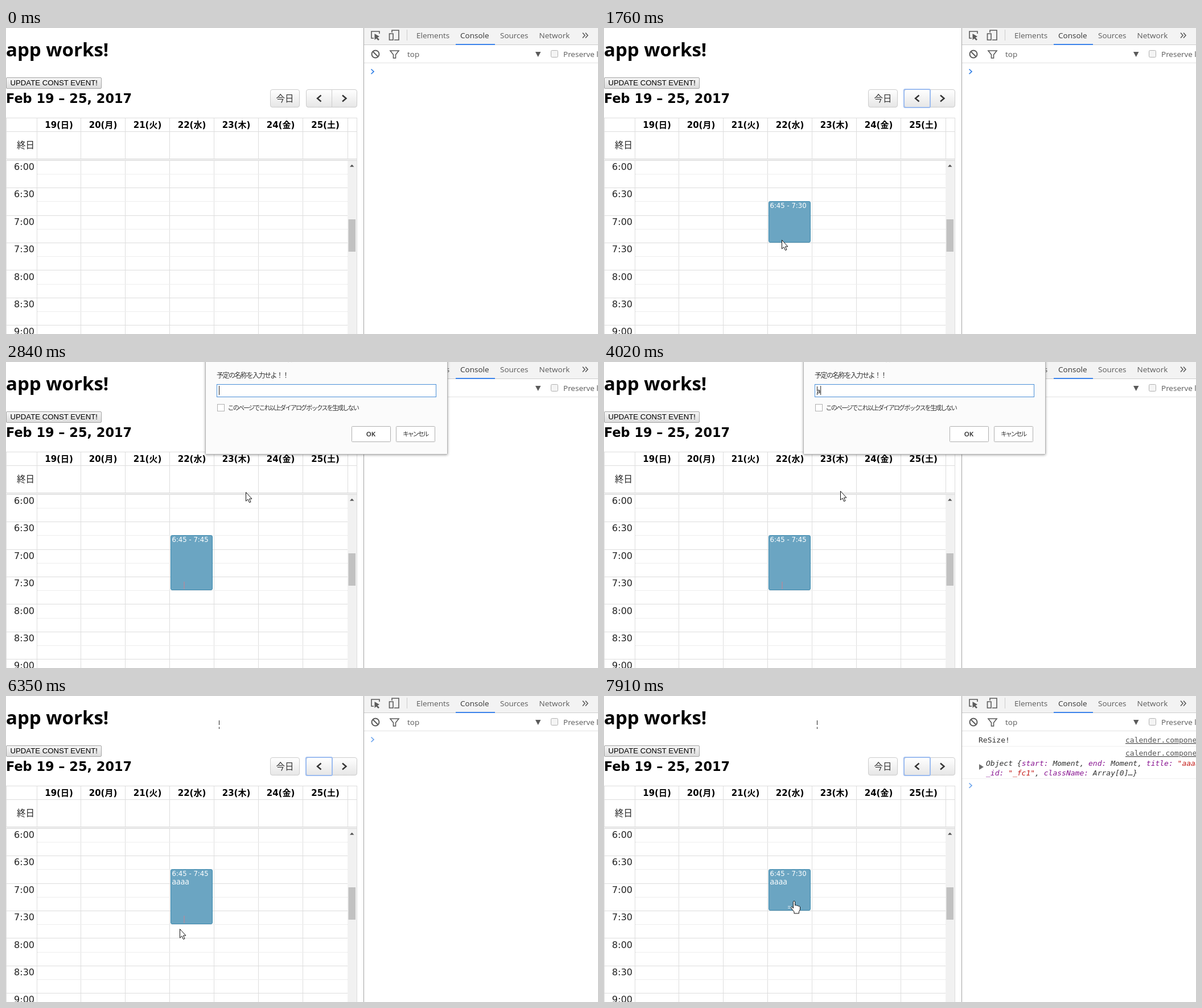
These frames come from a looping animation (1040 by 539 pixels, 8000 ms). An HTML page:

```html
<!DOCTYPE html>
<html lang="ja">
<head>
<meta charset="utf-8">
<title>Calendar demo</title>
<style>
html, body { margin: 0; width: 100%; height: 100%; overflow: hidden; background: #fff; }
svg { display: block; width: 1040px; height: 539px; }
text { font: 16px "DejaVu Sans", "Noto Sans CJK JP", "Noto Sans CJK", sans-serif; white-space: pre; }
.mid { text-anchor: middle; }
.day { font-weight: bold; font-size: 15px; }
.jp { font-family: "Noto Sans CJK JP", "Noto Sans CJK", sans-serif; }
.ui { font: 13.5px "Open Sans", "Noto Sans", sans-serif; fill: #5a5a5a; }
.mono { font: 13px "DejaVu Sans Mono", monospace; fill: #303030; }
.it { font-style: italic; }
.key { fill: #881391; }
.str { fill: #c41a16; }
.link { fill: #545454; text-decoration: underline; }
.icon { fill: none; stroke: #5a5a5a; stroke-width: 1.6; }
.btn { fill: url(#soft); stroke: #ccc; }
.box { fill: #fff; stroke: #b0b0b0; }
</style>
</head>
<body>
<svg viewBox="0 0 1040 539">
  <defs>
    <linearGradient id="soft" x2="0" y2="1"><stop stop-color="#fff"/><stop offset="1" stop-color="#e6e6e6"/></linearGradient>
    <linearGradient id="native" x2="0" y2="1"><stop stop-color="#f6f6f6"/><stop offset="1" stop-color="#dcdcdc"/></linearGradient>
    <filter id="shadow"><feDropShadow dx="0" dy="1" stdDeviation="2" flood-opacity=".35"/></filter>
  </defs>

  <text y="50" style="font:bold 33px 'Noto Sans',sans-serif">app works!</text>
  <rect x=".5" y="87.5" width="167" height="19" rx="1.5" fill="url(#native)" stroke="#a3a3a3"/>
  <text x="7.5" y="101" style="font:13.2px 'Liberation Sans',sans-serif">UPDATE CONST EVENT!</text>
  <text y="132" style="font-weight:bold;font-size:22.4px">Feb 19 – 25, 2017</text>
  <rect class="btn" x="464.5" y="108.5" width="51" height="31" rx="3.5"/>
  <text class="mid jp" x="490" y="130" fill="#333" style="font-size:15.5px">今日</text>
  <rect class="btn" x="527.5" y="108.5" width="89" height="31" rx="3.5"/>
  <path d="M572.5 109V139" stroke="#ccc"/>
  <rect id="focus" x="527" y="108" width="46" height="32" rx="2" fill="none" stroke="#9cbcf0" stroke-width="2"/>
  <path d="M553.5 118.5L547 124L553.5 129.5M591 118.5L597.5 124L591 129.5" fill="none" stroke="#333" stroke-width="2.4"/>

  <g id="grid"></g>
  <text class="jp" x="19" y="211.5" fill="#222" style="font-size:15.5px">終日</text>
  <rect x="600" y="234" width="16" height="305" fill="#f1f1f1"/>
  <rect x="601.5" y="337" width="12.5" height="57" fill="#c1c1c1"/>
  <path d="M604 244.5L607.7 240.5L611.5 244.5Z" fill="#505050"/>

  <g id="event">
    <rect id="eventBox" x="289.5" y="305.5" width="73" rx="2.5" fill="#6ba5c2" stroke="#3a87ad"/>
    <text id="eventTime" x="291.5" y="317" fill="#fff" style="font-size:11.7px"></text>
    <text id="eventTitle" x="291.5" y="332" fill="#fff" style="font:13.5px 'Noto Sans',sans-serif">aaaa</text>
    <path id="trace" d="M313 387V400" stroke="#9d93a8" stroke-width="2"/>
    <path id="grip" d="M323 370.5H328M323 373.5H328" stroke="#e4eef3"/>
  </g>

  <rect x="628" width="412" height="539" fill="#fff"/>
  <rect x="628" width="412" height="30" fill="#f3f3f3"/>
  <path d="M628.5 0V539" stroke="#a3a3a3"/>
  <path d="M629 29.5H1040M704.5 3V22" stroke="#ccc"/>
  <path d="M629 61.5H1040" stroke="#e2e2e2"/>
  <rect x="790" y="28" width="69" height="2" fill="#3b83ea"/>
  <g class="icon">
    <path d="M646 18H642V6H656V10"/>
    <path d="M647.5 10V21L650.5 18.5L654 22L656 20L652.5 17L656 15Z" fill="#5a5a5a" stroke="none"/>
    <path d="M678 8V4H690V21H682M673.5 10H680V21H673.5Z"/>
    <path d="M1013 8.5L1017 13L1013 17.5M1018 8.5L1022 13L1018 17.5"/>
    <circle cx="649" cy="46" r="6.5" stroke-width="2"/><path d="M644.5 41.5L653.5 50.5" stroke-width="2"/>
    <path d="M675 40H690L684.5 47V53H680.5V47Z"/>
  </g>
  <text class="ui" x="721" y="18">Elements</text>
  <text class="ui" x="798" y="18" style="fill:#333">Console</text>
  <text class="ui" x="868" y="18">Sources</text>
  <text class="ui" x="936.5" y="18">Network</text>
  <text class="ui" x="705" y="51">top</text>
  <path d="M930 42H939.5L934.7 51Z" fill="#5a5a5a"/>
  <rect class="box" x="957.5" y="39.5" width="12" height="12" rx="2" style="fill:#f4f4f4"/>
  <text class="ui" x="979" y="51">Preserve log</text>
  <g id="logs">
    <path d="M629 88.5H1040M629 145.5H1040" stroke="#f0f0f0"/>
    <text class="mono" x="658" y="82">ReSize!</text>
    <text class="mono link" x="916" y="82">calender.component.ts</text>
    <text class="mono link" x="916" y="105">calender.component.ts</text>
    <path d="M659 120V130L667 125Z" fill="#6e6e6e"/>
    <text class="mono it" x="671" y="123">Object {<tspan class="key">start:</tspan> Moment, <tspan class="key">end:</tspan> Moment, <tspan class="key">title:</tspan> <tspan class="str">"aaaa"</tspan>,</text>
    <text class="mono it" x="671" y="140"><tspan class="key">_id:</tspan> <tspan class="str">"_fc1"</tspan>, <tspan class="key">className:</tspan> Array[0]…}</text>
  </g>
  <path id="prompt" d="M641.5 72.5L646 76.7L641.5 81" fill="none" stroke="#2f7fe6" stroke-width="1.7"/>

  <g id="dialog">
    <rect x="350.5" y="-25" width="425" height="187.5" rx="1" fill="#fbfbfb" stroke="#b4b4b4" filter="url(#shadow)"/>
    <text class="ui" x="371" y="-1" style="font-size:14px;fill:#222">localhost:4200 <tspan class="jp" font-size="12">の内容:</tspan></text>
    <text class="jp" x="370" y="28" fill="#333" style="font-size:12px;letter-spacing:-1.5px">予定の名称を入力せよ！！</text>
    <rect x="370.5" y="39.5" width="385" height="22" fill="#fff" stroke="#4a8fd8"/>
    <text id="typed" x="374" y="55" style="font:11px 'Noto Sans',sans-serif"></text>
    <path id="caret" d="M374.5 42V58" stroke="#222"/>
    <rect class="box" x="371.5" y="74.5" width="12" height="12"/>
    <text class="jp" x="389.5" y="84.5" fill="#333" style="font-size:11px;letter-spacing:-1.8px">このページでこれ以上ダイアログボックスを生成しない</text>
    <rect class="box" x="607.5" y="113.5" width="68" height="27" rx="1"/>
    <text class="ui mid" x="641" y="131" style="font-size:11.5px;font-weight:600;fill:#222">OK</text>
    <rect class="box" x="685.5" y="113.5" width="68" height="27" rx="1"/>
    <text class="jp" x="697" y="131" fill="#333" style="font-size:11px;letter-spacing:-2.2px">キャンセル</text>
  </g>
  <path id="remnant" d="M374.5 43V51M374.5 54.5V58" stroke="#222"/>

  <g id="pointer" fill="#fff" stroke="#111" stroke-linejoin="round">
    <path id="arrow" d="M.5.5V16L4 12.8L6.5 18.5L9 17.5L6.5 12H11Z"/>
    <path id="hand" d="M-1.6 13V1.8a1.6 1.6 0 0 1 3.2 0V8c.8-1 2.8-.7 3.2.6c.9-.8 2.6-.4 3 .8c1.2-.6 2.7 0 2.7 1.6V15l-2 4v3H0V19L-5 13c-1.2-2 .8-3.6 2.2-2Z"/>
  </g>
</svg>
<script>
const LOOP = 8000, TICK = 77, START = 210, SLOT = 24.2;
const el = id => document.getElementById(id);
const show = (id, on) => el(id).style.display = on ? '' : 'none';
const clamp = v => Math.max(0, Math.min(1, v));

// Calendar grid
const columns = [0, 54, 131, 209, 287, 365, 443, 521, 600];
const line = (d, dash = '') => `<path d="${d}" stroke="#ddd" stroke-dasharray="${dash}"/>`;
let grid = '<rect y="231" width="617" height="2" fill="#eee"/>';
for (const y of [158, 182, 230, 233]) grid += line(`M0 ${y + .5}H617`);
for (const x of columns) grid += line(`M${x + .5} 158V230M${x + .5} 234V539`);
grid += line('M616.5 158V539');
for (let i = 0; i < 12; i++) {
  const y = Math.round(257 + i * SLOT) + .5;
  grid += i % 2 ? line(`M0 ${y}H600`) : line(`M55 ${y}H600`, '1 1');
}
for (let i = 0; i < 7; i++) {
  const hour = `${6 + (i >> 1)}:${i % 2 ? '30' : '00'}`;
  grid += `<text x="50" y="${Math.round(250 + i * 2 * SLOT)}" text-anchor="end" fill="#222">${hour}</text>`;
  grid += `<text class="mid day" x="${(columns[i + 1] + columns[i + 2]) / 2 + .5}" y="176">${19 + i}(${'日月火水木金土'[i]})</text>`;
}
el('grid').innerHTML = grid;

// Pointer path: time, x, y
const path = [
  [210, 640, 501], [590, 256, 400], [970, 309, 319], [1050, 306, 319], [1200, 306, 319],
  [1590, 311, 371], [1750, 312, 373], [1910, 315, 385], [2500, 315, 385], [2690, 421, 229],
  [2840, 421, 229], [3000, 415, 227], [5446, 415, 227], [5523, 426, 233], [6020, 305, 412],
  [6270, 305, 412], [6590, 311, 391], [7063, 311, 391], [7140, 325, 385], [7370, 334, 361]
];
const keyTimes = [4020, 4170, 4400, 4550];

function pointerAt(t) {
  const i = path.findIndex(p => p[0] > t);
  if (i < 0) return path[path.length - 1].slice(1);
  const a = path[Math.max(0, i - 1)], b = path[i];
  const k = clamp((t - a[0]) / (b[0] - a[0]));
  return [1, 2].map(j => Math.round(a[j] + (b[j] - a[j]) * k));
}

function draw(t) {
  const [x, y] = pointerAt(START + Math.floor((t - START) / TICK) * TICK);
  show('pointer', t >= START);
  el('pointer').setAttribute('transform', `translate(${x} ${y})`);
  show('arrow', t < 7140);
  show('hand', t >= 7140);
  show('focus', t >= 1200);

  // The event's end follows the pointer while it is dragged
  const dragging = t < 2500 || t >= 7140;
  const slots = dragging ? Math.max(1, Math.ceil((y - 305) / SLOT)) : 4;
  const end = 6 * 60 + 45 + slots * 15;
  show('event', t >= 1200);
  el('eventBox').setAttribute('height', Math.floor(slots * SLOT));
  el('eventTime').textContent = `6:45 - ${Math.floor(end / 60)}:${String(end % 60).padStart(2, '0')}`;
  show('eventTitle', t >= 4800);
  show('trace', t >= 2600 && t < 7060);
  show('grip', t >= 7830);

  const open = t < 4800 ? clamp((t - 2150) / 250) : clamp(1 - (t - 4780) / 90);
  const scale = .9 + .1 * open;
  const typed = keyTimes.filter(k => t >= k).length;
  show('dialog', t >= 2220 && t < 4870);
  el('dialog').setAttribute('opacity', open);
  el('dialog').setAttribute('transform', `translate(563 70) scale(${scale}) translate(-563 -70)`);
  el('typed').textContent = 'a'.repeat(typed);
  el('caret').setAttribute('transform', `translate(${typed * 6.2})`);
  show('remnant', t >= 4020);

  show('logs', t >= 7830);
  el('prompt').setAttribute('transform', `translate(0 ${t >= 7830 ? 81 : 0})`);
  el('prompt').setAttribute('opacity', t >= 4800 ? .7 : 1);
}

function frame() {
  draw(performance.now() % LOOP);
  requestAnimationFrame(frame);
}
frame();
</script>
</body>
</html>
```
